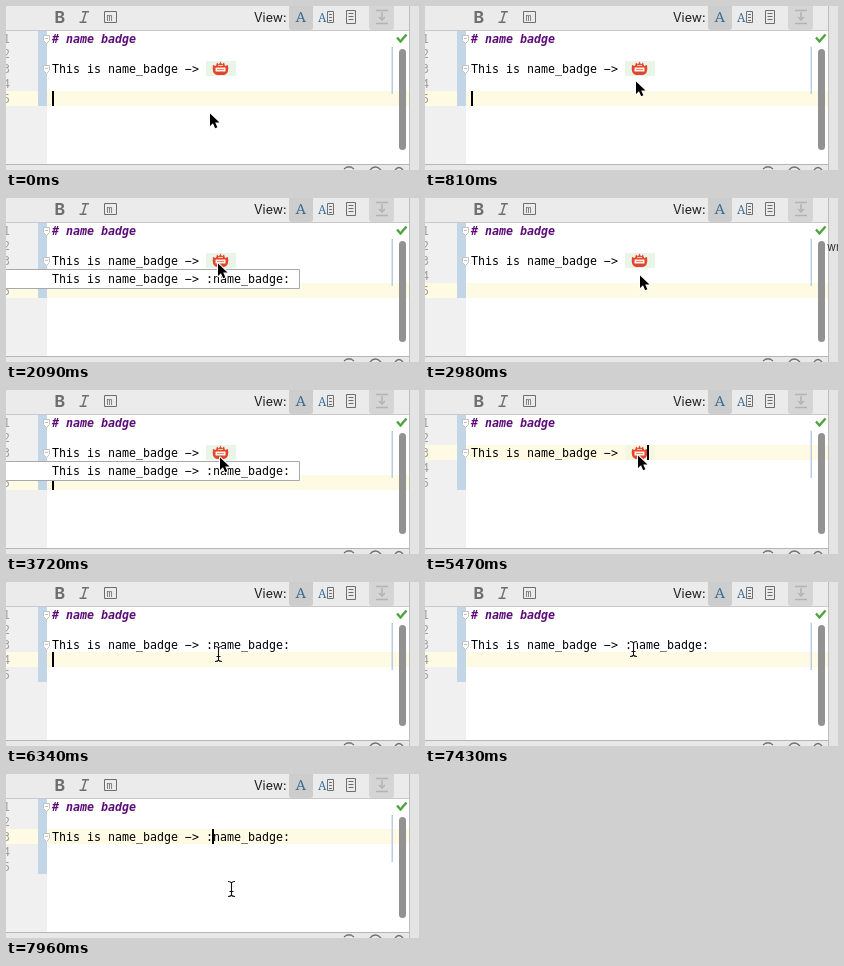
These frames come from a looping animation (413 px wide and 164 px high, 7.99 s). An HTML page with a canvas:

```html
<!DOCTYPE html>
<html lang="en">
<head>
<meta charset="utf-8">
<title>Emoji folding in an editor</title>
<style>
  html, body { margin: 0; width: 100%; height: 100%; overflow: hidden; background: #fff; }
  canvas { display: block; }
</style>
</head>
<body>
<canvas id="stage" width="413" height="164"></canvas>
<script>
const ctx = document.getElementById('stage').getContext('2d');
const LOOP = 7990, COL = 7, LEFT = 46, ROW = 15, TOP = 25;
const MONO = '11.63px "DejaVu Sans Mono", monospace';
const PREFIX = 'This is name_badge \u2212> ', EMOJI_CODE = ':name_badge:';

// Pointer hot spot: time, x, y
const PATH = [
  [0, 203, 106], [30, 203, 106], [810, 210, 74], [1000, 211, 64], [2090, 211, 64],
  [2390, 214, 80], [2810, 214, 80], [2980, 214, 76], [3200, 212, 64], [3400, 212, 64],
  [3420, 213, 64], [3700, 213, 64], [3720, 213, 66], [4170, 213, 66], [4370, 213, 69],
  [4460, 213, 72], [4670, 213, 72], [4850, 212, 64], [6080, 212, 64], [6160, 212, 69],
  [6190, 212, 72], [6760, 212, 72], [6810, 213, 73], [7260, 213, 73], [7580, 204, 62],
  [7820, 204, 62], [7960, 225, 115], [LOOP, 225, 115]
];
const UNFOLD = 5550, IBEAM = 6165, CLICK_BLANK = 6340, CLICK_TEXT = 7610;
const TOOLTIP = [[1230, 2150], [3250, 4230], [4940, 5470]];
const CARET_OFF = [[110, 320], [1820, 2320], [2820, 3250], [6080, 6340], [7110, 7610]];
const OTHER_WINDOW = [[2900, 3720]];

const during = (spans, t) => spans.some(([a, b]) => t >= a && t < b);
const rowY = n => TOP + (n - 1) * ROW;

function rect(x, y, w, h, color) {
  ctx.fillStyle = color;
  ctx.fillRect(x, y, w, h);
}
function round(x, y, w, h, r, color) {
  ctx.fillStyle = color;
  ctx.beginPath();
  ctx.roundRect(x, y, w, h, r);
  ctx.fill();
}
function text(str, x, y, font, color) {
  ctx.font = font;
  ctx.fillStyle = color;
  ctx.fillText(str, x, y);
}
function stroke(d, color, width = 1) {
  ctx.strokeStyle = color;
  ctx.lineWidth = width;
  ctx.stroke(new Path2D(d));
}
function fill(d, color) {
  ctx.fillStyle = color;
  ctx.fill(new Path2D(d));
}

function pointerAt(t) {
  const i = Math.max(1, PATH.findIndex(p => p[0] > t));
  const [t0, x0, y0] = PATH[i - 1], [t1, x1, y1] = PATH[i];
  const k = (t - t0) / (t1 - t0), s = k * k * (3 - 2 * k);
  return [Math.round(x0 + (x1 - x0) * s), Math.round(y0 + (y1 - y0) * s)];
}

function caretAt(t) {
  if (t < 5470) return [5, 46];
  if (t < UNFOLD) return [3, 222];
  if (t < CLICK_BLANK) return [3, 276];
  return t < CLICK_TEXT ? [4, 46] : [3, 206];
}

function drawToolbar() {
  rect(0, 0, 403, 24, '#ebebeb');
  rect(0, 24, 403, 1, '#c9c9c9');
  const gray = '#6e6e6e';
  text('B', 48.5, 17, 'bold 16px Inter, sans-serif', gray);
  stroke('M76 5.7h7M73.500 16.300h7M80 5.500L76.500 16.500', gray, 1.4);
  stroke('M98.500 5.500h12v11h-12z', gray);
  text('m', 100.5, 14.5, '10px "DejaVu Sans Mono", monospace', gray);
  text('View:', 248, 16, '12.5px Inter, sans-serif', '#1c1c1c');
  round(283, -3, 24, 27, 3, '#cdcdcd');
  text('A', 289.5, 16, '15px "Noto Serif", serif', '#3d7096');
  text('A', 312, 16, '12px "Noto Serif", serif', '#3d7096');
  stroke('M321.500 5.500h6v11h-6z M323 8.500h3M323 11.500h3M323 14.500h3', gray);
  stroke('M340.500 4.500h9v13h-9z M342.500 7.500h5M342.500 10.500h5M342.500 13.500h5', gray);
  round(363, -3, 25, 27, 3, '#d5d5d5');
  stroke('M370 4.500h12M370 17.500h12M376 6v8M373 11l3 3 3-3', '#b3b3b3', 1.5);
}

function drawEmoji() {
  fill('M207 59l3 1 1-3.500 2 2 1.500-3 1.500 3 2-2 1 3.500 3-1q1.500 9-4 10h-7q-5.500-1-4-10z', '#e4442c');
  fill('M209.500 61.500h10v4h-10z', '#fff3ec');
  stroke('M211 63.500h7', '#ee8c78');
  stroke('M212 59.500h5', '#ffc9a0');
}

function drawEditor(t) {
  const [row, caretX] = caretAt(t), y = rowY(row);
  rect(0, 25, 403, 133, '#fff');
  rect(0, 25, 41, 133, '#f0f0f0');
  rect(0, y, 403, ROW, '#fffae3');
  rect(32, 25, 9, 75, '#c3d6e8');
  ctx.textAlign = 'right';
  for (let n = 1; n <= 5; n++) text(n, 4, rowY(n) + 12, MONO, '#a0a0a0');
  ctx.textAlign = 'left';
  for (const n of [1, 3]) {
    const path = `M37.500 ${rowY(n) + 4.5}h6v5l-3 3-3-3z`;
    fill(path, '#fff');
    stroke(path + `M39 ${rowY(n) + 7.5}h3`, '#c2c2c2');
  }

  text('# name badge', LEFT, 37, 'italic bold ' + MONO, '#5c0d78');
  text(PREFIX, LEFT, 67, MONO, '#000');
  if (t < UNFOLD) {
    rect(200, 55, 30, ROW, row === 3 ? '#f4f8e0' : '#e9f5e6');
    drawEmoji();
  } else {
    text(EMOJI_CODE, LEFT + PREFIX.length * COL, 67, MONO, '#000');
  }
  if (!during(CARET_OFF, t)) rect(caretX, y, 2, ROW, '#000');

  rect(385.5, 41, 1.5, 47, '#bccbe8');
  round(393, 43, 7, 101, 3.5, '#929292');
  stroke('M391 31.500l3.500 4 6-7', '#4da33c', 2.4);
}

function drawFrame(t) {
  rect(0, 158, 403, 6, '#e8e8e8');
  rect(0, 158, 403, 1, '#b5b5b5');
  stroke('M338 163l3-2h4l3 2M364 164q5-6 11 0M389 164q4-5 8 0', '#707070', 1.3);
  rect(403, 0, 10, 164, '#e4e4e4');
  rect(403, 0, 1, 164, '#bdbdbd');
  if (during(OTHER_WINDOW, t)) text('wn', 402, 53, '11px Inter, sans-serif', '#333');
}

function drawTooltip() {
  rect(0, 71, 294, 20, '#fff');
  stroke('M0 71.500h293.500v19H0', '#a8a8a8');
  text(PREFIX + EMOJI_CODE, LEFT, 85, MONO, '#000');
}

function drawPointer(t) {
  const [x, y] = pointerAt(t);
  ctx.save();
  ctx.translate(x, y);
  ctx.lineJoin = 'round';
  if (t < IBEAM) {
    const arrow = 'M1 1.500v12.500l3-2.800 2.200 5 2.200-1-2.200-4.700h4.300z';
    stroke(arrow, '#fff', 2);
    fill(arrow, '#000');
  } else {
    const beam = 'M-3 -7.500q3 0 3.500 1.500q.5-1.500 3.500-1.500M-3 7.500q3 0 3.500-1.500q.5 1.500 3.500 1.500M.500-6v12M-1.500 2.500h4';
    stroke(beam, '#fff', 2.6);
    stroke(beam, '#111', 1.1);
  }
  ctx.restore();
}

function draw(now) {
  const t = now % LOOP;
  drawToolbar();
  drawEditor(t);
  drawFrame(t);
  if (during(TOOLTIP, t)) drawTooltip();
  drawPointer(t);
  requestAnimationFrame(draw);
}
requestAnimationFrame(draw);
</script>
</body>
</html>
```
